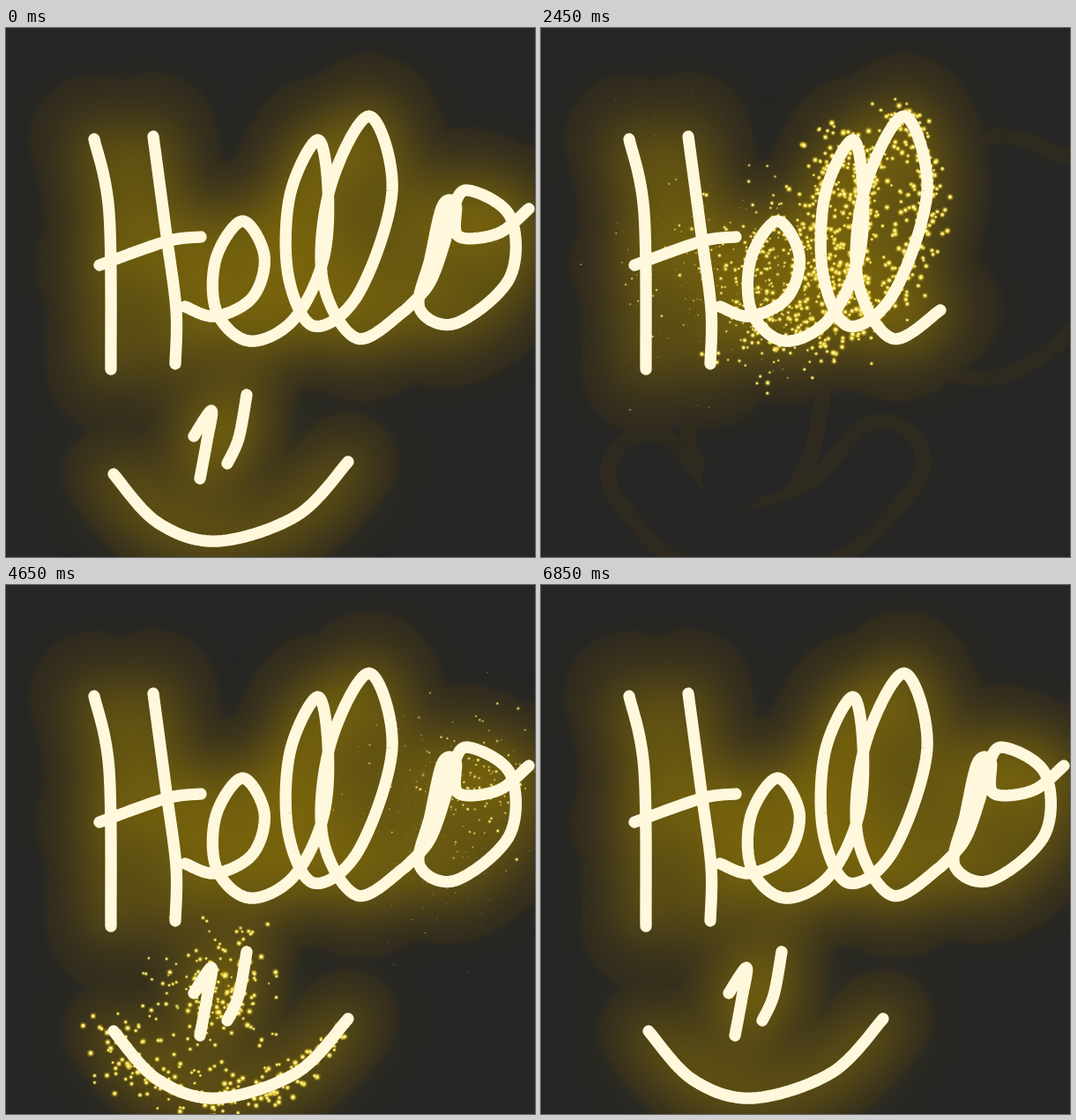
These frames come from a looping animation (600 px wide and 600 px high, 6.95 s). An HTML page with a canvas:

```html
<!DOCTYPE html>
<html lang="en">
<head>
<meta charset="utf-8">
<title>Neon hello</title>
<style>
html, body { margin: 0; width: 100%; height: 100%; overflow: hidden; background: #262624; }
canvas { display: block; width: 100vmin; height: 100vmin; }
</style>
</head>
<body>
<canvas id="stage" width="600" height="600"></canvas>
<script>
const ctx = document.getElementById('stage').getContext('2d');
const LOOP = 6950, STEP = 50, LIFE = 2050, RIM = 18;
const DARK = '#262624', HAZE = '#2f2a1f', GLOW = 'rgb(122,102,12)', TUBE = '#fff8dc';

let seed = 7;
const random = () => (seed = seed * 16807 % 2147483647) / 2147483647;
const clamp = v => Math.min(1, Math.max(0, v));

// Smooth curve through a few key points, "x,y x,y ..."
function curve(text) {
  const p = text.split(' ').map(s => s.split(',').map(Number));
  const pts = [p[0]];
  for (let i = 0; i < p.length - 1; i++) {
    const a = p[i - 1] || p[i], b = p[i], c = p[i + 1], d = p[i + 2] || c;
    for (let u = 1 / 16; u <= 1; u += 1 / 16) {
      pts.push([0, 1].map(n => b[n] + 0.5 * u * (c[n] - a[n] +
        u * (2 * a[n] - 5 * b[n] + 4 * c[n] - d[n] +
        u * (3 * (b[n] - c[n]) + d[n] - a[n])))));
    }
  }
  return pts;
}

// A group is written at constant speed; pen lifts take no time.
// Reach is the radius of its haze, density its sparks per pixel.
function makeGroup(start, end, reach, density, ...lines) {
  const pts = [];
  let length = 0;
  for (const text of lines) {
    curve(text).forEach(([x, y], i) => {
      const last = pts[pts.length - 1];
      if (i) length += Math.hypot(x - last.x, y - last.y);
      pts.push({ x, y, at: length, lift: !i });
    });
  }
  return { start, end, reach, density, pts, length };
}

function penAt(g, length) {
  const i = Math.max(1, g.pts.findIndex(p => p.at >= length));
  const a = g.pts[i - 1], b = g.pts[i];
  const u = (length - a.at) / (b.at - a.at || 1);
  return { x: a.x + u * (b.x - a.x), y: a.y + u * (b.y - a.y) };
}

const groups = [
  // H
  makeGroup(450, 1106, 72, 0.45,
    '100,126 117,210 119,387',
    '167,123 182,235 193,320 192,381',
    '221,237 182,242 106,269'),
  // ell
  makeGroup(1150, 2450, 70, 1,
    '203,316 238,327 280,305 293,258 268,219 238,262 239,322 276,355 326,331 360,262 ' +
    '365,180 353,127 322,190 320,280 349,338 400,301 438,185 412,100 368,180 359,285 ' +
    '398,352 453,320'),
  // o
  makeGroup(2450, 3450, 70, 1,
    '453,320 480,290 497,245 506,210 523,184 572,214 571,284 510,335 469,318 481,262 ' +
    '495,202 510,200 513,236 558,233 593,205'),
  // Face
  makeGroup(3490, 4550, 55, 1,
    '213,463 233,434 228,468 220,511',
    '273,416 264,465 251,494',
    '122,506 172,561 240,582 330,553 388,492')
];

// Sparks leave the pen tip in random directions
const sparks = groups.flatMap(g => {
  const count = Math.round(g.length * g.density);
  return Array.from({ length: count }, (_, i) => {
    const angle = random() * 2 * Math.PI, speed = 6 + 70 * random() ** 1.8;
    return {
      ...penAt(g, g.length * i / count),
      vx: Math.cos(angle) * speed, vy: Math.sin(angle) * speed,
      birth: g.start + (g.end - g.start) * i / count,
      size: 0.9 + random(), life: LIFE * (0.75 + 0.25 * random())
    };
  });
});

function written(g, t) {
  const path = new Path2D();
  const length = g.length * clamp((t - g.start) / (g.end - g.start));
  if (!length) return path;
  for (const p of g.pts) {
    if (p.at >= length && p !== g.pts[0]) break;
    p.lift ? path.moveTo(p.x, p.y) : path.lineTo(p.x, p.y);
  }
  const tip = penAt(g, length);
  path.lineTo(tip.x, tip.y);
  return path;
}

function stroke(c, path, width, color) {
  c.lineCap = c.lineJoin = 'round';
  c.lineWidth = width;
  c.strokeStyle = color;
  c.stroke(path);
}

// Outer edge of the full haze, which stays while the sign is dark
function makeRim() {
  const canvas = document.createElement('canvas');
  canvas.width = canvas.height = 600;
  const c = canvas.getContext('2d');
  const spread = inset =>
    groups.forEach(g => stroke(c, written(g, LOOP), 2 * (g.reach - inset), HAZE));
  spread(0);
  c.globalCompositeOperation = 'destination-out';
  spread(RIM);
  return canvas;
}
const rim = makeRim();

function dot(x, y, r, color) {
  ctx.fillStyle = color;
  ctx.beginPath();
  ctx.arc(x, y, r, 0, 2 * Math.PI);
  ctx.fill();
}

// Sparks are yellow with a halo at first, then shrink to pale dust
function drawSpark(p, t) {
  const age = t - p.birth;
  if (age <= 0 || age >= p.life) return;
  const x = p.x + p.vx * age / 1000, y = p.y + p.vy * age / 1000;
  const hot = clamp((1600 - age) / 700);
  const r = p.size * (0.45 + 0.55 * hot);
  ctx.globalAlpha = clamp(2.5 * (1 - age / p.life));
  dot(x, y, r * 2.2, `rgba(205,175,20,${0.4 * hot})`);
  dot(x, y, r * 1.4, `rgba(245,220,60,${0.6 * hot})`);
  dot(x, y, r, hot > 0.3 ? '#fff3a0' : '#d9cc92');
  ctx.globalAlpha = 1;
}

function draw(t) {
  ctx.fillStyle = DARK;
  ctx.fillRect(0, 0, 600, 600);
  ctx.drawImage(rim, 0, 0);

  const sign = new Path2D();
  ctx.filter = 'blur(4px)';
  for (const g of groups) {
    const path = written(g, t);
    stroke(ctx, path, 2 * g.reach, HAZE);
    sign.addPath(path);
  }
  ctx.filter = 'blur(31px)';
  stroke(ctx, sign, 44, GLOW);
  ctx.filter = 'none';

  sparks.forEach(p => drawSpark(p, t));
  stroke(ctx, sign, 13.3, TUBE);
}

let shown = -1;
const origin = performance.now();
function tick() {
  const t = Math.floor((performance.now() - origin) % LOOP / STEP) * STEP;
  if (t !== shown) {
    shown = t;
    draw(t < STEP ? LOOP : t);
  }
  requestAnimationFrame(tick);
}
tick();
</script>
</body>
</html>
```
